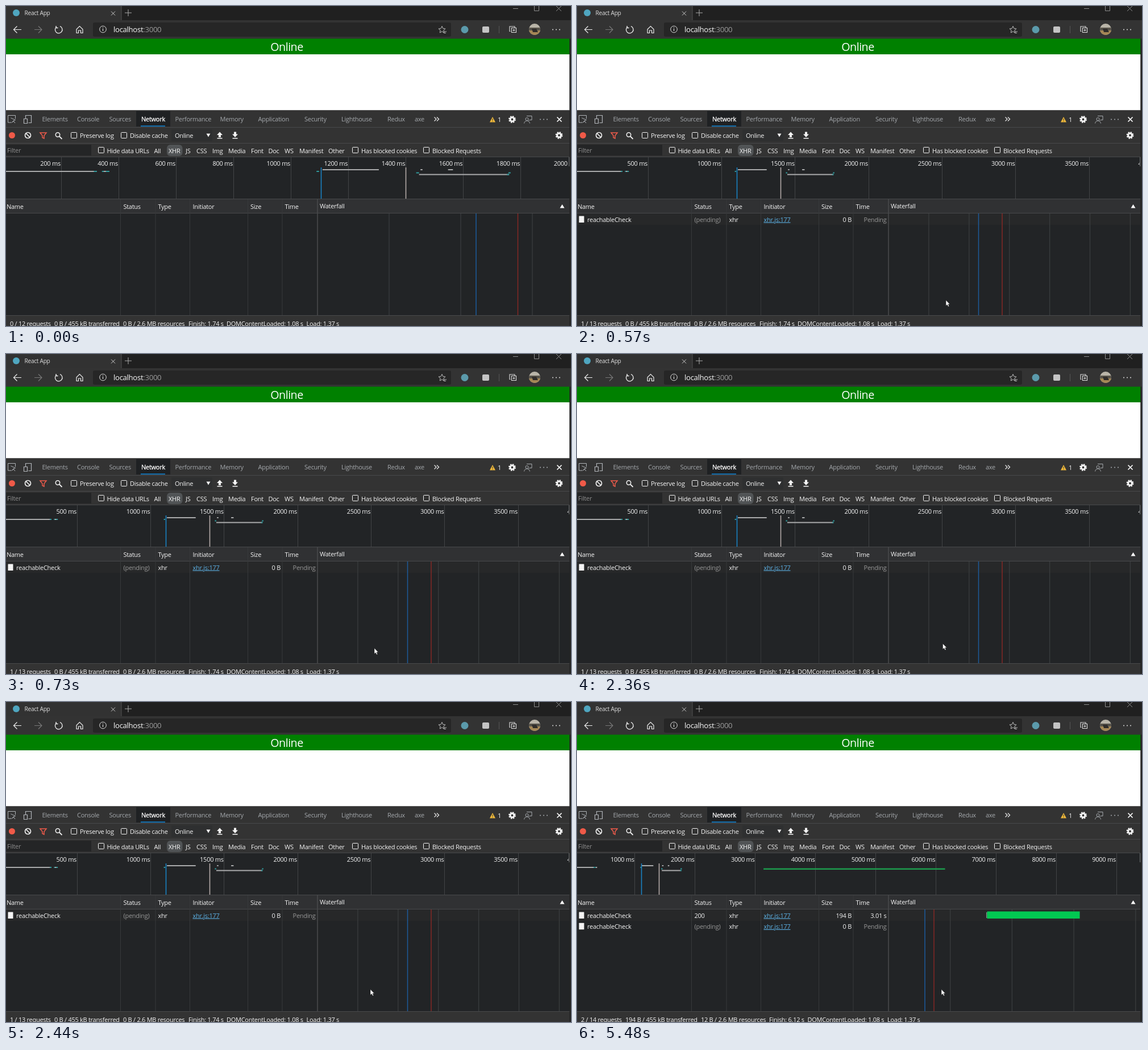
An HTML page that plays this animation: 994x563 px, repeating every 8000 ms.

```html
<!DOCTYPE html>
<html lang="en">
<head>
<meta charset="utf-8">
<title>Network panel</title>
<style>
  html, body { margin: 0; width: 100%; height: 100%; overflow: hidden; background: #202020; }
  svg { display: block; width: 994px; height: 563px; }
  text { font-family: "Open Sans", "Noto Sans", sans-serif; letter-spacing: -.025em; }
</style>
</head>
<body>
<svg id="stage" viewBox="0 0 994 563" xmlns="http://www.w3.org/2000/svg"></svg>
<script>
const LOOP = 8000, RIGHT = 991.5;
const LIGHT = '#f4f4f4', GREY = '#a4a8ac', PANEL = '#333333', BODY = '#222426', GRID = '#424446';

const rect = (x, y, w, h, fill, extra = '') =>
  `<rect x="${x}" y="${y}" width="${w}" height="${h}" fill="${fill}" ${extra}/>`;
const circle = (x, y, r, fill, extra = '') =>
  `<circle cx="${x}" cy="${y}" r="${r}" fill="${fill}" ${extra}/>`;
const stroke = (d, color = LIGHT, width = 1, extra = '') =>
  `<path d="${d}" fill="none" stroke="${color}" stroke-width="${width}" ${extra}/>`;
const shape = (d, fill = LIGHT) => `<path d="${d}" fill="${fill}"/>`;
const text = (x, y, str, fill = LIGHT, size = 11, extra = '') =>
  `<text x="${x}" y="${y}" fill="${fill}" font-size="${size}" ${extra}>${str}</text>`;
const endText = (x, y, str, fill) => text(x, y, str, fill, 11, 'text-anchor="end"');
const vline = (x, y1, y2, color = GRID, width = 1) => stroke(`M${x} ${y1}V${y2}`, color, width);
const rules = (...ys) => stroke(ys.map(y => `M0 ${y}H${RIGHT}`).join(''), '#48494b');
const checkbox = (x, y) => rect(x + .5, y + .5, 10, 10, 'none', `stroke="${LIGHT}" rx="1"`);
const dots = (x, y, color) => [0, 6, 12].map(d => circle(x + d, y, 1, color)).join('');
const labels = (y, fill, items) => items.map(([x, s]) => text(x, y, s, fill)).join('');
const gear = (x, y) =>
  circle(x, y, 3.4, 'none', 'stroke="#f4f4f4" stroke-width="3"') +
  circle(x, y, 5.4, 'none', 'stroke="#f4f4f4" stroke-width="2" stroke-dasharray="2.4 1.84"');

function browserChrome() {
  return rect(0, 0, 994, 25, '#202020') + rect(0, 0, 203, 26, '#323232') + rect(0, 25, 994, 33, '#333333') +
    circle(18, 12, 6, '#4fa6c0') + text(32.5, 15.5, 'React App', '#dedede', 10.1) +
    stroke('M185 9.500l7 7m0-7l-7 7', '#ccc') + vline(203, 0, 25, '#505050') +
    stroke('M209 12h12m-6-6v12', '#aaa') +
    stroke('M892 4.500h9M929.500-1v9.500h8V-1zM968 0l9 9m0-9l-9 9', '#8c8c8c') +
    stroke('M27 41.500H13.500m6-6l-6 6l6 6', '#eee', 1.2) +
    stroke('M50 41.500h13m-6-6l6 6l-6 6', '#777', 1.2) +
    stroke('M89 36.500a6.300 6.300 0 1 0 6 -.8M88 35v3.500h3.500', '#eee', 1.3) +
    stroke('M124 41l5.500-5.500l5.500 5.500v6.500h-3.500v-4.500h-4v4.500h-3.500z', '#eee', 1.2) +
    rect(153, 29, 630, 25, '#262626', 'rx="3"') +
    circle(170.5, 41, 5.8, 'none', 'stroke="#ddd"') + stroke('M170.500 40v4M170.500 37.500v1.300', '#ddd', 1.2) +
    text(189, 46, 'localhost<tspan fill="#9a9a9a">:3000</tspan>', '#f8f8f8', 13.2) +
    stroke('M767 35.500l1.800 4l4.200 .5l-3.200 2.800l.9 4.200l-3.700-2.200l-3.700 2.200l.9-4.200l-3.200-2.800l4.200-.5z', '#bbb') +
    stroke('M770 45h5M770 47.500h4', '#bbb') +
    circle(807, 41.5, 6.5, '#5b9aab') + rect(838, 36, 12, 11, '#c4c4c4', 'rx="2"') +
    vline(867.5, 35, 48, '#555') +
    stroke('M889.500 38.500h8v8h-8zM887.500 44.500h-1.500v-8.500h9v2M893.500 40.500v4m-2-2h4', '#ddd', 1.1) +
    avatar() + dots(962, 41.5, '#ddd');
}

function avatar() {
  return `<clipPath id="face"><circle cx="930" cy="41" r="10"/></clipPath><g clip-path="url(#face)">` +
    rect(920, 31, 20, 20, '#b9b4a8') + rect(920, 38, 20, 5, '#57534a') + rect(920, 43, 20, 9, '#a58755') +
    shape('M925 40h8l3 6h-9z', '#2f2c2a') + '</g>';
}

function page() {
  return rect(0, 57.5, RIGHT, 27.5, '#008000') + rect(0, 85, RIGHT, 99, '#ffffff') +
    text(494, 79, 'Online', '#ffffff', 19.7, 'text-anchor="middle"');
}

function toolbars() {
  return rect(0, 183.5, RIGHT, 379.5, BODY) + rect(0, 183.5, RIGHT, 82.5, PANEL) +
    rect(229, 185, 60, 27, '#1f2123') + rect(237, 210.5, 43, 1.5, '#0f86d8') +
    rules(213.5, 241.5, 265.5) +
    stroke('M10 205h-6.500v-12.500h13v6M8.500 197l8 3.500l-3.500 1.500l3 4m-3-4l-2 3z', '#b0b4b8') +
    stroke('M34.500 199v-6.500h10v13h-5M31.500 198.500h6v8h-6z', '#b0b4b8', 1.2) +
    labels(203, GREY, [[63.5, 'Elements'], [125, 'Console'], [181.5, 'Sources'], [297.5, 'Performance'],
      [376.5, 'Memory'], [443.5, 'Application'], [525, 'Security'], [590, 'Lighthouse'], [671, 'Redux'], [719, 'axe']]) +
    text(238, 203, 'Network', '#ffffff', 11, 'stroke="#fff" stroke-width=".3"') +
    stroke('M753.500 195.500l3.500 3.500l-3.500 3.500m4.500-7l3.500 3.500l-3.500 3.500', '#ddd', 1.4) +
    shape('M856 195l5 9.500h-10z', '#f0b93a') + stroke('M856 198v3.500m0 1v1', '#333') + text(865, 204, '1') +
    gear(890.5, 199.5) +
    stroke('M916 193.500h9v7h-4l-2 2', '#a8acb0') + circle(916.5, 199, 2.5, PANEL, 'stroke="#a8acb0"') +
    stroke('M911.500 206.500q1-4.500 5-4.500t5 4.500', '#a8acb0') +
    dots(940, 199.5, '#a8acb0') + stroke('M969.500 195.500l8 8m0-8l-8 8', '#fff', 1.7) +
    circle(10.5, 227.5, 5.5, '#f05a48') +
    circle(38.5, 227.5, 5, 'none', 'stroke="#eee" stroke-width="1.700"') + stroke('M35 224l7 7', '#eee', 1.7) +
    stroke('M60 223h11l-4 5v5l-3-1.500v-3.500z', '#ef5b4b', 1.5) +
    circle(91, 226.5, 3.7, 'none', 'stroke="#eee" stroke-width="1.600"') + stroke('M94 229.500l4.500 4.500', '#eee', 1.8) +
    checkbox(114, 222) + checkbox(202, 222) + rect(291, 217, 72, 21, '#2e2f30') +
    labels(232, LIGHT, [[130, 'Preserve log'], [218, 'Disable cache'], [297, 'Online']]) +
    shape('M352.500 224.500h7l-3.500 6z') +
    shape('M376 221.500l5 5.500h-3v4h-4v-4h-3zM371.500 232h9v1.500h-9z') +
    shape('M403 231l-5-5.500h3v-4h4v4h3zM398.500 232h9v1.500h-9z') + gear(973, 227.5) +
    rect(0, 244, 150, 19, '#242526') + text(2, 258, 'Filter', '#8d8d8d') +
    rect(283, 244, 27.5, 20, '#515456', 'rx="6"') +
    [162, 609, 734].map(x => checkbox(x, 248)).join('') +
    labels(258.5, LIGHT, [[177.5, 'Hide data URLs'], [260.5, 'All'], [286, 'XHR'], [316, 'JS'], [335, 'CSS'],
      [363, 'Img'], [391, 'Media'], [431, 'Font'], [461.5, 'Doc'], [490, 'WS'], [516, 'Manifest'], [567, 'Other'],
      [625, 'Has blocked cookies'], [750, 'Blocked Requests']]);
}

// Overview bars: start ms, end ms, y, colour
const BAR = '#a9aaab', TEAL = '#2f9a9c';
const overviewBars = [
  [0, 324, 290, BAR], [314, 324, 290, TEAL], [342, 368, 290, TEAL], [348, 356, 290, BAR],
  [1089, 1098, 290, TEAL], [1110, 1306, 287, BAR], [1436, 1446, 292.5, TEAL], [1451, 1458, 287, BAR],
  [1547, 1564, 287, BAR], [1446, 1759, 295.5, BAR], [1752, 1760, 295.5, TEAL], [1757, 1765, 292.5, TEAL]
];

function overview({ step, gap, finished }) {
  const toX = ms => ms / step * gap - 4;
  const marker = (ms, color) => vline(Math.floor(toX(ms)) + .5, 284, 339, color, 1.6);
  let out = '<g clip-path="url(#overview)">';
  for (let i = 1; toX((i - 1) * step) < 1000; i++) {
    const x = toX(i * step);
    out += vline(Math.floor(x) + .5, 266, 339) + endText(x - 1.2, 281, `${i * step} ms`);
  }
  for (const [a, b, y, color] of overviewBars)
    out += rect(toX(a), y, Math.max(2.5, toX(b) - toX(a)), 2, color);
  if (finished) out += rect(toX(3136), 292.5, toX(6152) - toX(3136), 2.5, '#1c9a4c');
  return out + marker(1105, '#1a82c4') + marker(1400, '#b4aaa8') + '</g>' + rect(990, 266, 1.5, 16, '#66686a');
}

function requestRow(i, done) {
  const y = 379.5 + i * 19.3, dim = '#969696';
  return rect(3.5, y - 10, 9, 11.5, '#f4f4f4', 'rx=".5"') + text(18, y, 'reachableCheck') +
    text(206.5, y, done ? '200' : '(pending)', done ? LIGHT : dim) + text(267.5, y, 'xhr') +
    text(328.5, y, 'xhr.js:177', '#5cb0e4', 11, 'text-decoration="underline"') +
    endText(483, y, done ? '194 B' : '0 B') + endText(544.5, y, done ? '3.01 s' : 'Pending', done ? LIGHT : dim);
}

function table({ rows, grid, dom, load, bar }) {
  let out = rect(0, 339, RIGHT, 26, '#303133') + rules(339.5, 364.5);
  if (rows.length) out += rect(0, 365, RIGHT, 20, '#272829');
  for (let x = 548 + grid; x < RIGHT; x += grid) out += vline(x, 365, 544, '#3a3c3e', 1.3);
  out += [201.5, 263, 323.5, 425.5, 486].map(x => vline(x, 340, 544, '#37393b')).join('') +
    vline(548, 340, 544, '#48494b', 1.6) + vline(dom, 365, 544, '#1d5b9c', 1.5) + vline(load, 365, 544, '#8b2925', 1.4);
  if (bar) out += rect(bar[0] - 1.5, 370, 1.5, 10, '#8a8c8e') + rect(bar[0], 368.5, bar[1] - bar[0], 12.5, '#02c852');
  return out + labels(357, LIGHT, [[1, 'Name'], [206.5, 'Status'], [267.5, 'Type'], [328.5, 'Initiator'],
    [430, 'Size'], [490.5, 'Time']]) + text(552, 356, 'Waterfall') + shape('M978.500 349l4 6.500h-8z', '#fff') +
    rows.map((done, i) => requestRow(i, done)).join('');
}

function footer({ count, finished }) {
  const xs = finished ? [7, 85, 218, 338, 405.5, 546] : [7, 85, 206, 321, 388, 528.5];
  const parts = [`${count} requests`, `${finished ? '194' : '0'} B / 455 kB transferred`,
    `${finished ? '12' : '0'} B / 2.6 MB resources`, `Finish: ${finished ? '6.12' : '1.74'} s`,
    'DOMContentLoaded: 1.08 s', 'Load: 1.37 s'];
  return rect(0, 544, RIGHT, 19, PANEL) + rules(544.5) +
    labels(563, LIGHT, parts.map((s, i) => [xs[i], s]));
}

const states = [
  { at: 0, step: 200, gap: 101.06, grid: 126, dom: 827, load: 900.5, rows: [], count: '0 / 12' },
  { at: 570, step: 500, gap: 129.3, grid: 70.9, dom: 706.5, load: 748, rows: [false], count: '1 / 13' },
  { at: 3540, step: 500, gap: 66.2, grid: 72.2, dom: 631.5, load: 652.5, rows: [true], count: '1 / 13',
    finished: true, bar: [776.5, RIGHT] },
  { at: 5480, step: 1000, gap: 105.9, grid: 108.7, dom: 612, load: 628, rows: [true, false], count: '2 / 14',
    finished: true, bar: [721.5, 884.5] }
];

// Pointer tip: time, x, y
const pointerPath = [[190, 648.5, 517], [730, 647.5, 517], [2290, 646.5, 515.5], [2360, 643, 509], [2440, 640.5, 505]];

const stage = document.getElementById('stage');
stage.innerHTML = '<clipPath id="overview"><rect x="0" y="266" width="989.5" height="73"/></clipPath>' +
  browserChrome() + page() + toolbars() + '<g id="network"></g>' + rect(RIGHT, 57.5, 3, 506, '#252525') +
  '<path id="pointer" d="M.5 .5v10l2.300-2l1.700 3.500l1.700-.8l-1.600-3.400h3z" fill="#fff" stroke="#111" stroke-width=".5"/>';
const network = document.getElementById('network');
const pointer = document.getElementById('pointer');
let shown;

function render(t) {
  const state = states.findLast(s => s.at <= t);
  if (state !== shown) {
    network.innerHTML = overview(state) + table(state) + footer(state);
    shown = state;
  }
  const spot = pointerPath.findLast(p => p[0] <= t);
  pointer.setAttribute('visibility', spot ? 'visible' : 'hidden');
  if (spot) pointer.setAttribute('transform', `translate(${spot[1]} ${spot[2]})`);
}

const start = performance.now();
function tick() {
  render((performance.now() - start) % LOOP);
  requestAnimationFrame(tick);
}
tick();
</script>
</body>
</html>
```
